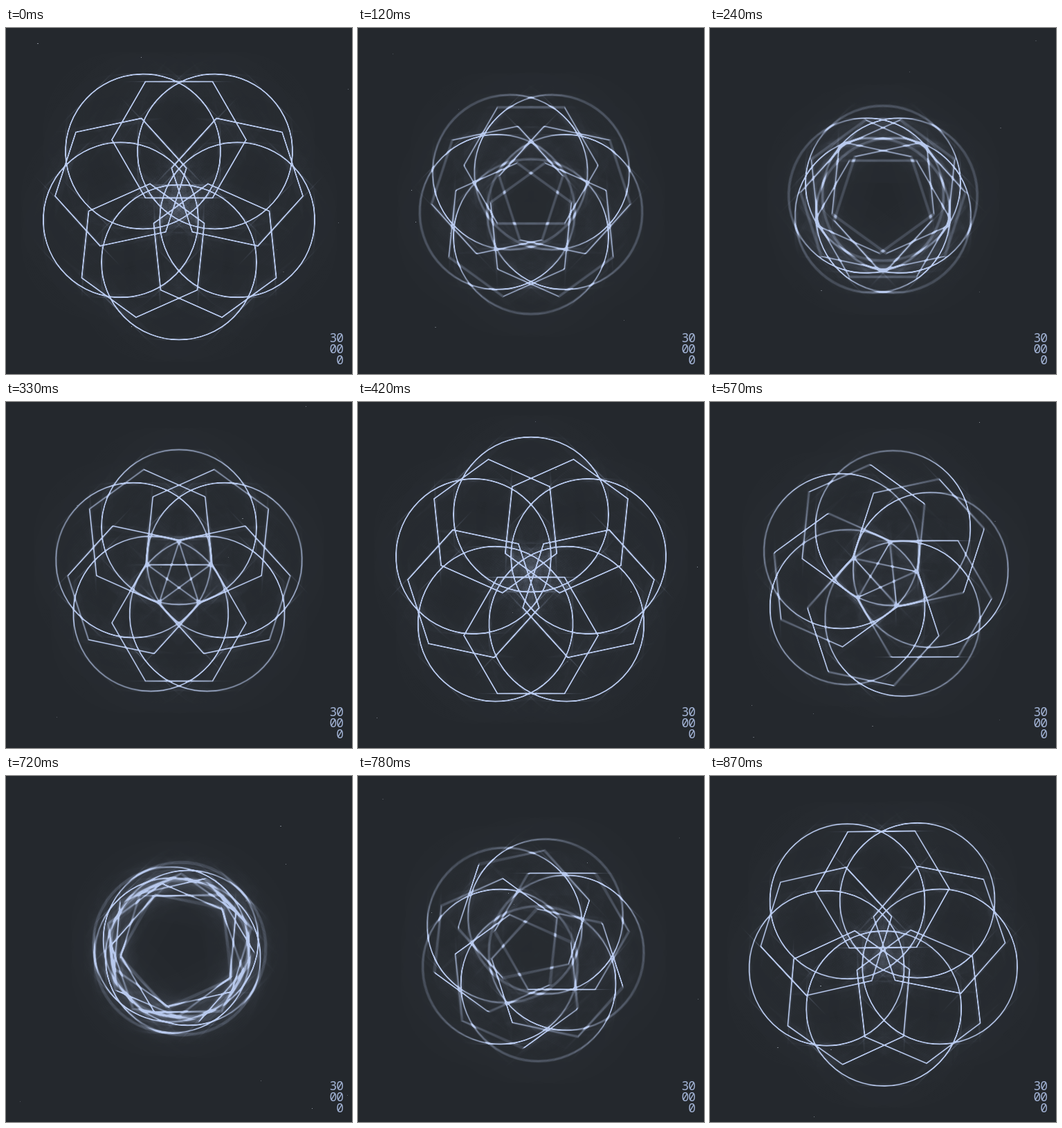
Animation of 500x500 px, one loop 900 ms. Source, as an HTML page with a canvas:

```html
<!DOCTYPE html>
<html lang="en">
<head>
<meta charset="utf-8">
<title>Rosette</title>
<style>
html, body { margin: 0; width: 100%; height: 100%; overflow: hidden; background: #24282d; }
canvas { display: block; width: 500px; height: 500px; }
</style>
</head>
<body>
<canvas id="stage" width="500" height="500"></canvas>
<script>
const SIZE = 500, FRAMES = 30, FRAME_MS = 30, TAU = Math.PI * 2;
const REACH = 88.5, CIRCLE = 112, HEXAGON = 97;
const SHUTTER = 0.25, SAMPLES = 6;
const BACKGROUND = '#24282d', TINT = 'rgb(148,161,192)';
const STREAKS = [[1, 0], [0, 1], [1, 1], [1, -1]];

const ctx = document.getElementById('stage').getContext('2d');

function makeLayer() {
  const canvas = document.createElement('canvas');
  canvas.width = canvas.height = SIZE;
  return canvas.getContext('2d');
}
const lines = makeLayer(), light = makeLayer();
let streak = makeLayer(), spare = makeLayer();

function wipe(layer, color) {
  layer.globalCompositeOperation = 'source-over';
  layer.globalAlpha = 1;
  layer.fillStyle = color;
  layer.fillRect(0, 0, SIZE, SIZE);
}

function square(layer) {
  layer.globalAlpha = 1;
  layer.globalCompositeOperation = 'multiply';
  layer.drawImage(layer.canvas, 0, 0);
}

// The shapes swing through the centre; the way back adds a fifth of a turn.
function poseAt(frame) {
  const f = (frame + FRAMES) % FRAMES;
  const c = Math.cos(TAU * f / FRAMES);
  return {
    offset: REACH * c - (16.2 - 2.9 * c) * (1 - c * c),
    turn: f > FRAMES / 2 ? TAU / 10 * (1 + c) : 0
  };
}

function strokeRosette(frame) {
  const { offset, turn } = poseAt(frame);
  for (let k = 0; k < 5; k++) {
    lines.save();
    lines.translate(SIZE / 2, SIZE / 2);
    lines.rotate(turn + k * TAU / 5);
    lines.beginPath();
    lines.arc(0, offset, CIRCLE, 0, TAU);
    lines.stroke();
    lines.beginPath();
    for (let i = 0; i < 6; i++) {
      const a = i * TAU / 6;
      lines.lineTo(HEXAGON * Math.cos(a), HEXAGON * Math.sin(a) - offset);
    }
    lines.closePath();
    lines.stroke();
    lines.restore();
  }
}

// Squaring dims strokes that motion has smeared.
function drawLines(frame) {
  wipe(lines, '#000');
  lines.globalCompositeOperation = 'lighter';
  lines.globalAlpha = 1 / SAMPLES;
  lines.strokeStyle = '#fff';
  lines.lineWidth = 2;
  for (let i = 0; i < SAMPLES; i++) {
    strokeRosette(frame + SHUTTER * ((i + 0.5) / SAMPLES - 0.5));
  }
  square(lines);
}

// Directional blur by repeated doubling, squared so only aligned strokes flare.
function addStreak([dx, dy]) {
  wipe(streak, '#000');
  streak.drawImage(lines.canvas, 0, 0);
  for (let s = 1; s <= 16; s *= 2) {
    wipe(spare, '#000');
    spare.drawImage(streak.canvas, -s * dx, -s * dy);
    spare.globalAlpha = 0.5;
    spare.drawImage(streak.canvas, s * dx, s * dy);
    [streak, spare] = [spare, streak];
  }
  square(streak);
  light.drawImage(streak.canvas, 0, 0);
}

function randomFrom(seed) {
  return () => {
    seed = (Math.imul(seed, 1664525) + 1013904223) >>> 0;
    return seed / 4294967296;
  };
}

function drawDust(frame) {
  const random = randomFrom(frame * 7919 + 31);
  random();
  for (let i = 0; i < 7; i++) {
    const x = Math.floor(random() * SIZE), y = Math.floor(random() * SIZE);
    ctx.fillStyle = `rgba(200,208,220,${0.2 + 0.5 * random()})`;
    ctx.fillRect(x, y, random() < 0.3 ? 2 : 1, 1);
  }
}

function drawLabel() {
  ctx.font = '18px "Noto Sans Mono", monospace';
  ctx.fontStretch = 'extra-condensed';
  ctx.letterSpacing = '-1px';
  ctx.textAlign = 'right';
  ctx.fillStyle = '#a3b4d6';
  ['30', '00', '0'].forEach((text, row) => ctx.fillText(text, 487, 454 + row * 16));
}

function draw(frame) {
  drawLines(frame);
  wipe(light, '#000');
  light.globalCompositeOperation = 'lighter';
  light.drawImage(lines.canvas, 0, 0);
  STREAKS.forEach(addStreak);
  light.globalCompositeOperation = 'multiply';
  light.fillStyle = TINT;
  light.fillRect(0, 0, SIZE, SIZE);

  wipe(ctx, BACKGROUND);
  ctx.globalCompositeOperation = 'lighter';
  ctx.drawImage(light.canvas, 0, 0);
  ctx.globalCompositeOperation = 'source-over';
  drawDust(frame);
  drawLabel();
}

let shown = -1;
function tick() {
  const frame = Math.floor(performance.now() / FRAME_MS) % FRAMES;
  if (frame !== shown) draw(shown = frame);
  requestAnimationFrame(tick);
}
tick();
</script>
</body>
</html>
```
